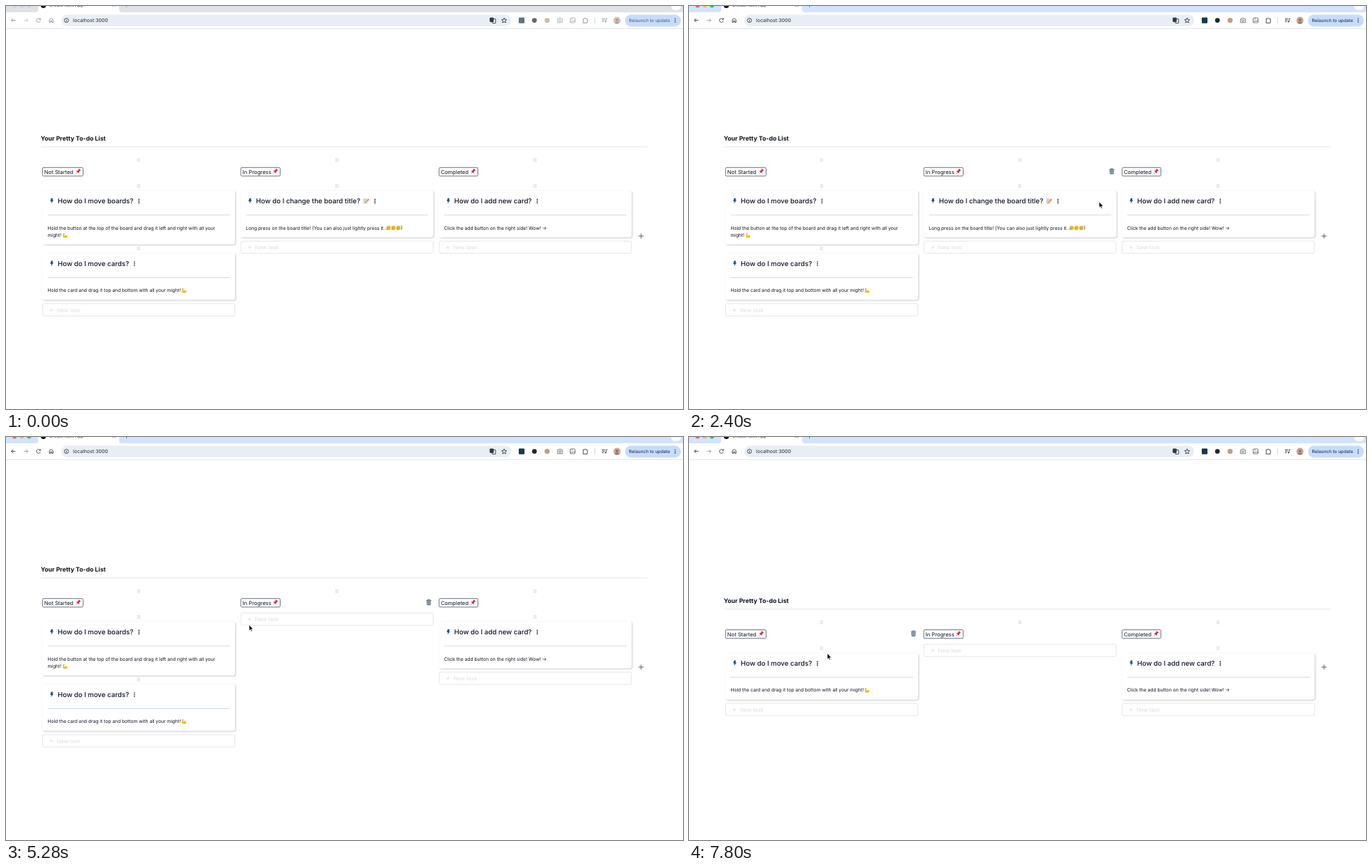
An HTML page that plays this animation: 969 by 578 pixels, repeating every 8000 ms.

```html
<!DOCTYPE html>
<html lang="en">
<head>
<meta charset="utf-8">
<title>To-do board</title>
<style>
  html, body { margin: 0; width: 100%; height: 100%; overflow: hidden; background: #fff; }
  svg { display: block; width: 969px; height: 578px; --strip: #dee1e6; --ink: #8d9196; --dim: .7; }
  svg.focused { --strip: #d3e3fd; --ink: #35383c; --dim: 1; }
  text { font-family: Inter, sans-serif; text-rendering: geometricPrecision; white-space: pre; }
  .line { fill: none; stroke: var(--ink); stroke-width: .9; }
  .solid { fill: var(--ink); }
  .dim { opacity: var(--dim); }
  .card { fill: #fff; filter: drop-shadow(1.1px 1.3px .8px rgba(0, 0, 0, .21)); }
  .menu { fill: #fff; filter: drop-shadow(0 1px 2px rgba(0, 0, 0, .3)); }
</style>
</head>
<body>
<svg id="stage" viewBox="0 0 969 578">
  <g id="chrome"></g>
  <g id="board"></g>
  <g id="menu"></g>
  <circle id="ring" r="11.2" fill="none" stroke="#555" stroke-width="1.2"/>
  <path id="arrow" d="M0 0V8.3L1.9 6.6 3.2 9.4 4.5 8.8 3.2 6.1H5.8Z" fill="#000" stroke="#fff" stroke-width=".6"/>
  <path id="hand" d="M-.9 .1Q0-.8 .7 .2L1.4 2.7 2.6 2.3 3.6 2.8 4.7 3 5.2 5.5 4.4 8.4H.5L-2.1 5.2Q-2 3.9 -1.2 4.2L-.1 4.9Z" fill="#fff" stroke="#222" stroke-width=".8" stroke-linejoin="round"/>
</svg>
<script>
const $ = id => document.getElementById(id);
const LOOP = 8000, INK = '#0c1220';
const SIZE = { heading: 8.75, title: 9.68, label: 7.7, body: 6.72 };

const text = (x, y, s, size, fill = INK, weight = 400) =>
  `<text x="${x}" y="${y}" font-size="${size}" fill="${fill}" font-weight="${weight}">${s}</text>`;
const rect = (x, y, w, h, r, attrs) =>
  `<rect x="${x}" y="${y}" width="${w}" height="${h}" rx="${r}" ${attrs}/>`;
const circle = (x, y, r, attrs) => `<circle cx="${x}" cy="${y}" r="${r}" ${attrs}/>`;
const path = (d, attrs) => `<path d="${d}" ${attrs}/>`;
const at = (x, y, body) => `<g transform="translate(${x} ${y})">${body}</g>`;
const dots = (x, y, gap, r, attrs) => [-gap, 0, gap].map(d => circle(x, y + d, r, attrs)).join('');
const plus = (x, y, r, color, width) =>
  path(`M${x - r} ${y}h${2 * r}M${x} ${y - r}v${2 * r}`, `stroke="${color}" stroke-width="${width}"`);

// Small pictures, centred on 0,0
const bolt = path('M-1-3.8H1.7L.8-.9H2.5L-1.2 4-.5.5H-2.3Z', 'fill="#234d70"');
const pin = `<g transform="rotate(40)">${path('M0 1V4.5', 'stroke="#8a98a3" stroke-width=".8"')}
  ${path('M-1.7-3.8H1.7L1.2-.8 2.6 1.4H-2.6L-1.2-.8Z', 'fill="#d8293b"')}</g>`;
const muscle = path('M-3.1-2.9-1.2-3.3-.5-1.6-1.6-.7-1.2.7Q.9-1 2.9.2 4 2 2.3 3.1-.9 4-3.3 2.4Z', 'fill="#f6b928"');
const cry = circle(0, 0, 3.2, 'fill="#f8c43a"') + path('M-1.8-.8h1.1M.7-.8h1.1M-1 1.7Q0 .7 1 1.7', 'fill="none" stroke="#6b4a16" stroke-width=".6"')
  + path('M-2.3 0h1.2V2.6h-1.2Z', 'fill="#62b4e8"');
const memo = rect(-4, -4, 7, 8, .5, 'fill="#e3e6ea"') + path('M-2.8-2H2M-2.8 0H1.5M-2.8 2H0', 'stroke="#9aa5b1" stroke-width=".6"')
  + path('M-.8 3 4-2.2', 'stroke="#e99a2c" stroke-width="1.6"') + path('M3.4-1.6 4.3-2.6', 'stroke="#d8574f" stroke-width="1.6"');
const trash = path('M-3.8-2.6H3.8M-1.4-2.8V-3.9H1.4V-2.8', 'fill="none" stroke="#5c6f80" stroke-width="1"')
  + path('M-3.2-1.7H3.2L2.6 4.2H-2.6Z', 'fill="#6a7b8b"') + path('M-1.2-.6V3M1.2-.6V3', 'stroke="#dbe3ea" stroke-width=".7"');
const handle = (x, y) =>
  path(`M${x - 2.3} ${y - 1.9}h4.6m-4.6 1.9h4.6m-4.6 1.9h4.6`, 'stroke="#c9ccd1" stroke-width=".7"');

const CARDS = {
  boards: { title: 'How do I move boards?', dots: 138.3, h: 77.3,
    lines: ['Hold the button at the top of the board and drag it left and right with all your', 'might!'],
    extra: at(32.7, 64.2, muscle) },
  cards: { title: 'How do I move cards?', dots: 131.8, h: 67,
    lines: ['Hold the card and drag it top and bottom with all your might!'], extra: at(203, 53.6, muscle) },
  title: { title: 'How do I change the board title?', dots: 192.3, h: 67,
    lines: ['Long press on the board title! (You can also just lightly press it...'],
    extra: at(179, 15, memo) + [211.8, 218.8, 225.8].map(x => at(x, 53.5, cry)).join('') + text(229.3, 55.7, ')', SIZE.body) },
  add: { title: 'How do I add new card?', dots: 140.8, h: 67,
    lines: ['Click the add button on the right side! Wow! →'], extra: '' },
};

const card = (x, y, c) => at(x, y,
  rect(0, 0, 276, c.h, 3, 'class="card"') + at(13.6, 14.7, bolt) +
  text(22, 18.3, c.title, SIZE.title, INK, 500) + dots(c.dots, 15, 2.5, .85, 'fill="#111"') +
  path('M7.7 35H268.5', 'stroke="#cddde5"') +
  c.lines.map((s, i) => text(7.4, 55.8 + i * 10.6, s, SIZE.body)).join('') + c.extra);

function column(x, title, width, names, hovered) {
  let out = handle(x + 137.7, 221) +
    rect(x + .3, 231.7, width, 12.2, 1.6, 'fill="#fff" stroke="#59636f" stroke-width=".9"') +
    text(x + 2.8, 240.7, title, SIZE.label) + at(x + width - 6.7, 237.3, pin);
  if (hovered) out += at(x + 269.3, 237, trash);
  let bottom = 252.4;
  for (const name of names) {
    out += handle(x + 137.7, bottom + 5.8) + card(x, bottom + 12.4, CARDS[name]);
    bottom += 12.4 + CARDS[name].h;
  }
  const top = names.length ? bottom + 5.4 : bottom;
  return out + rect(x + .4, top, 275.2, 17.6, 2, 'fill="#fff" stroke="#e2e4e8" stroke-width=".9"') +
    plus(x + 13, top + 9, 2.5, '#dadce1', .8) + text(x + 20.8, top + 11.7, 'New task', SIZE.label, '#dcdee3');
}

function drawBoard(titleGone, boardsGone, hovered) {
  const list = text(49.8, 192.7, 'Your Pretty To-do List', SIZE.heading, INK, 700) +
    path('M50 202H918', 'stroke="#e1e4e8"') +
    column(52, 'Not Started', 58, boardsGone ? ['cards'] : ['boards', 'cards'], hovered === 1) +
    column(335.8, 'In Progress', 56.3, titleGone ? [] : ['title'], hovered === 2) +
    column(619.6, 'Completed', 55.5, ['add'], false);
  $('board').innerHTML = at(0, boardsGone ? 44.85 : 0, list) + plus(909, 330, 3.6, '#555b63', 1);
}

function drawMenu(x, hover) {
  $('menu').innerHTML = x ? at(x, 281.4,
    rect(0, 0, 39.5, 41, 2, 'class="menu"') +
    (hover ? rect(0, hover === 'edit' ? 0 : 20.5, 39.5, 20.5, 1, 'fill="#f0f2f4"') : '') +
    text(7.5, 13.4, 'Edit', SIZE.label, '#3b64c4') + text(7.5, 33.4, 'Delete', SIZE.label, '#c92f2a')) : '';
}

const line = d => path(d, 'class="line"');
$('chrome').innerHTML =
  rect(0, 0, 969, 9, 0, 'fill="var(--strip)"') +
  path('M42 9Q46 9 46 5V0H162V5Q162 9 166 9Z', 'fill="#fff"') +
  ['#ff5f57', '#febc2e', '#28c840'].map((c, i) => circle(12.3 + i * 10.3, -.8, 3.2, `class="light" fill="${c}"`)).join('') +
  circle(53.5, -.8, 3.7, 'fill="#111"') + text(62, 1.4, 'Create Next App', 6.25, '#33363a') +
  line('M152.5-3l4 4m0-4-4 4M172.5-4V1.5') + rect(952, -8, 14, 14, 5, 'fill="#fff" opacity=".85"') +
  path('M0 32.5H969', 'stroke="#e3e6ea"') +
  line('M13.5 20.5H7.7M10.4 17.8 7.7 20.5 10.4 23.2') +
  `<g opacity=".5">${line('M25.5 20.5H31.3M28.6 17.8 31.3 20.5 28.6 23.2')}</g>` +
  line('M48.7 18.8A2.8 2.8 0 1 0 49.2 21.3M49.3 17.3V19.3H47.2') +
  line('M62 23.4V19.7L64.6 17.6 67.3 19.7V23.4H65.5V21.2H63.8V23.4Z') +
  rect(79, 12.5, 644, 16.5, 8.2, 'fill="#e9eef6"') +
  `<g fill="none" stroke="#35383c" stroke-width=".9">${circle(86.5, 20.6, 3, '')}${path('M86.5 20.2V22.3M86.5 18.8V19.4', '')}
    ${path('M713 17 714 19.5 716.6 19.7 714.6 21.4 715.3 24 713 22.6 710.7 24 711.4 21.4 709.4 19.7 712 19.5Z', '')}
    ${rect(696, 18.6, 4.8, 6, .5, '')}${rect(692.8, 17, 4.8, 5.5, .5, 'fill="#35383c"')}</g>` +
  text(96, 23.1, 'localhost:3000', 7.05, '#25282c') +
  `<g class="dim">${rect(733.9, 16.6, 8.2, 8.2, 1, 'fill="#173848"') + circle(756.3, 20.6, 3.4, 'fill="#20262b"') +
    circle(774.5, 20.6, 3.7, 'fill="#c39c82"')}</g>` +
  `<g opacity=".75">${line('M789.3 18.6H791L791.7 17.4H794L794.7 18.6H796.3V23.8H789.3Z') + circle(792.8, 21, 1.4, 'class="line"') +
    rect(807.5, 17, 7, 7, 1, 'class="line"') + line('M808 23.5 810 21 811.4 22.3 812.8 20.7 814.4 23M809 18.7H811')}</g>` +
  line('M826 18.3H828Q828.5 16 830 18.3H832V20.2Q834 21 832 22V24.3H826V22Q827.5 21 826 20Z') +
  path('M842.7 16.5V25', 'stroke="#c9d8ee"') +
  line('M853 18.2H857.5M853 20.3H857M853 22.4H855.6M859 22.5V18H860.7') + circle(858, 22.6, 1, 'class="solid"') +
  `<g class="dim">${circle(874.5, 20.7, 5.1, 'fill="#c9a792"') + path('M871 24Q874.5 20.8 878 24Q874.5 27 871 24Z', 'fill="#8d7466"') +
    circle(874.5, 20, 2, 'fill="#8d7466"')}</g>` +
  rect(886, 12.4, 80, 17, 8.5, 'fill="#c8dcfa"') +
  `<g class="dim">${text(891.5, 23, 'Relaunch to update', 6.4, '#243858', 500)}</g>` + dots(957.8, 20.7, 2.4, .8, 'fill="#1c2f50"');

// Pointer path: time, x, y
const PATH = [
  [30, 486, 558], [180, 554, 318], [300, 535, 377], [660, 535, 377], [870, 541, 357], [1050, 541, 357],
  [1560, 592, 277], [1620, 592, 277], [1790, 587, 284], [2130, 587, 284], [2370, 587, 281], [2700, 590, 281],
  [3090, 590, 281], [3510, 527, 275], [3930, 527, 275], [4050, 532.5, 303.5], [4350, 540, 313], [4830, 540, 313],
  [5280, 348, 269.5], [5340, 338, 271], [5520, 338, 271], [5700, 310, 272], [5940, 310, 272], [6040, 306, 274],
  [6360, 306, 274], [6780, 188.5, 282], [7230, 188.5, 282], [7500, 198, 310.5], [LOOP, 198, 310.5],
];
const CLICKS = [[1800, 1860], [3570, 3630], [4410, 4500], [6060, 6120], [6990, 7050], [7680, 7800]];

function pointer(t) {
  const i = PATH.findIndex(p => p[0] > t);
  if (i < 1) return { x: -50, y: -50 };
  const [t0, x0, y0] = PATH[i - 1], [t1, x1, y1] = PATH[i];
  const u = (t - t0) / (t1 - t0), k = u * u * (3 - 2 * u);
  return { x: x0 + (x1 - x0) * k, y: y0 + (y1 - y0) * k };
}

const within = (t, a, b) => t >= a && t < b;
const place = (id, shown, x, y) => {
  $(id).setAttribute('visibility', shown ? 'visible' : 'hidden');
  $(id).setAttribute('transform', `translate(${x} ${y})`);
};
const last = {};
function whenChanged(draw, ...args) {
  const key = args.join();
  if (last[draw.name] !== key) { last[draw.name] = key; draw(...args); }
}

function setFocus(focused) {
  $('stage').classList.toggle('focused', focused);
  document.querySelectorAll('.light').forEach(el => el.style.fill = focused ? '' : '#cfd2d7');
}

function frame() {
  const t = performance.now() % LOOP, { x, y } = pointer(t);
  whenChanged(setFocus, t >= 1800);
  whenChanged(drawBoard, t >= 4500, t >= 7800, t < 2130 ? 0 : t < 5580 ? 2 : 1);

  const menuX = within(t, 3630, 4500) ? 527.5 : within(t, 7050, 7800) ? 190 : 0;
  const hover = !menuX || x < menuX || y < 282 ? '' : y < 305 ? 'edit' : 'delete';
  whenChanged(drawMenu, menuX, hover);

  const hand = within(t, 3450, 4500) || within(t, 6720, 7800);
  place('hand', t >= 30 && hand, x, y);
  place('arrow', t >= 30 && !hand, x, y);
  const shift = hand ? 4 : 0;
  place('ring', CLICKS.some(([a, b]) => within(t, a, b)), x - shift, y - shift);
  requestAnimationFrame(frame);
}
frame();
</script>
</body>
</html>
```
